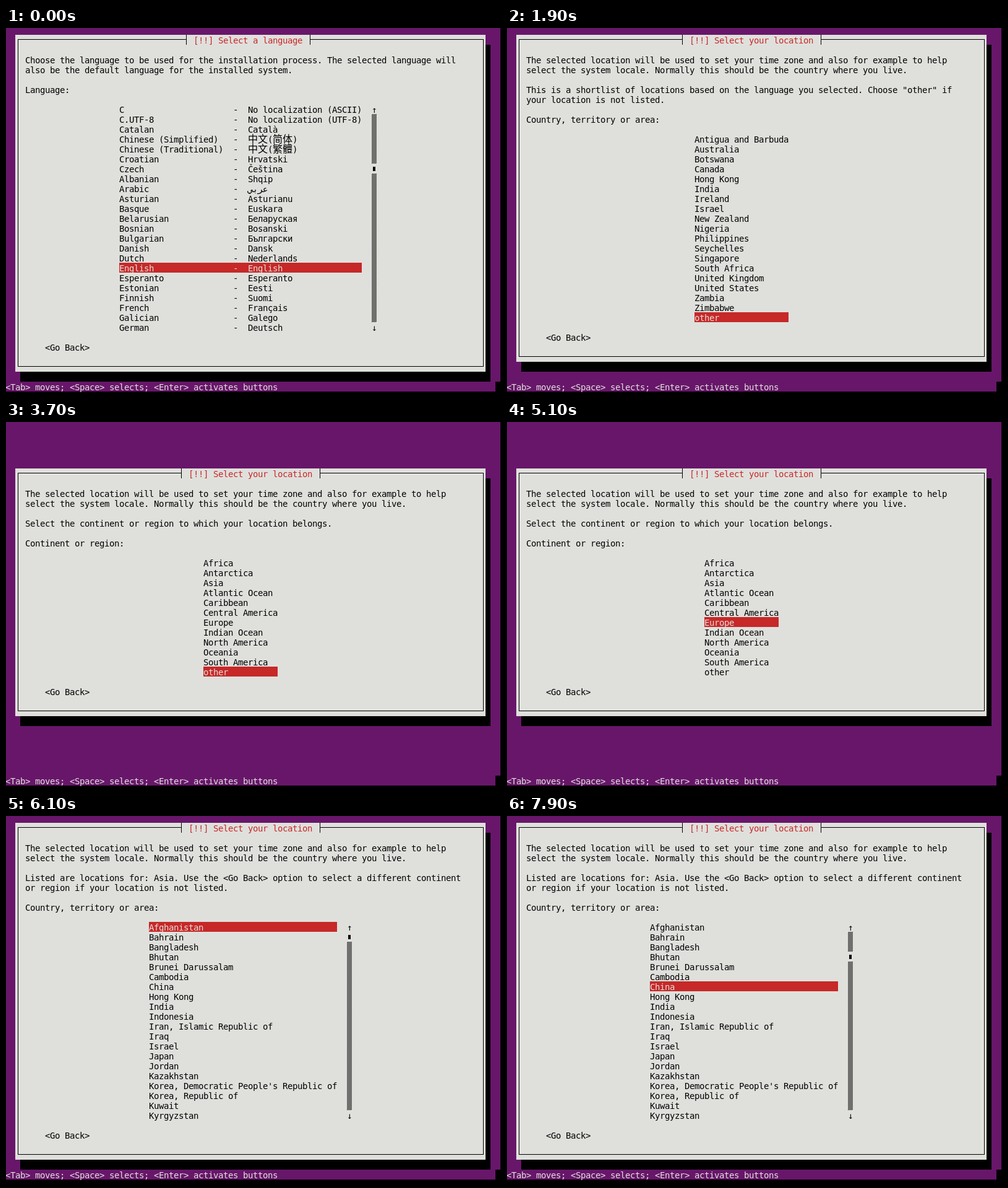
An HTML page that plays this animation: 800 px wide and 591 px high, repeating every 8 s.

```html
<!DOCTYPE html>
<html lang="en">
<head>
<meta charset="utf-8">
<title>Installer</title>
<style>
  :root { --purple: #68166a; --paper: #dfe0dc; --red: #c72828; }
  html, body { margin: 0; width: 100%; height: 100%; overflow: hidden; background: #000; }
  #stage {
    position: relative; width: 800px; height: 591px; overflow: hidden; background: #000;
    font: 14px/16px "DejaVu Sans Mono", "Noto Sans CJK SC", "Noto Sans CJK", monospace;
    letter-spacing: calc(8px - 1ch);
    font-variant-ligatures: none;
  }
  #stage div { position: absolute; white-space: pre; }
  #stage i { font: 16px/0 "Noto Sans CJK SC", "Noto Sans CJK", sans-serif; letter-spacing: 0; }
  .desk { background: var(--purple); }
  .paper { background: var(--paper); }
  .ink { background: #000; }
  .bar { background: var(--red); }
  .title { color: var(--red); }
  .light { color: var(--paper); }
  .track { background: repeating-conic-gradient(#000 0 25%, #0000 0 50%) 0 0 / 2px 2px; }
</style>
</head>
<body>
<div id="stage"></div>
<script>
const LOOP = 8000;
const stage = document.getElementById('stage');
const LOCATION = '[!!] Select your location';
const ABOUT = `The selected location will be used to set your time zone and also for example to help
select the system locale. Normally this should be the country where you live.

`;

const languages = `C|No localization (ASCII)
C.UTF-8|No localization (UTF-8)
Catalan|Català
Chinese (Simplified)|中文(简体)
Chinese (Traditional)|中文(繁體)
Croatian|Hrvatski
Czech|Čeština
Albanian|Shqip
Arabic|عربي
Asturian|Asturianu
Basque|Euskara
Belarusian|Беларуская
Bosnian|Bosanski
Bulgarian|Български
Danish|Dansk
Dutch|Nederlands
English|English
Esperanto|Esperanto
Estonian|Eesti
Finnish|Suomi
French|Français
Galician|Galego
German|Deutsch`.split('\n').map(line => {
  const [name, native] = line.split('|');
  return name.padEnd(23) + '-  ' + native;
});

const screens = {
  language: {
    top: 1, col: 23, title: '[!!] Select a language', items: languages, thumb: () => 5,
    intro: `Choose the language to be used for the installation process. The selected language will
also be the default language for the installed system.

Language:`
  },
  shortlist: {
    top: 1, col: 38, title: LOCATION,
    intro: ABOUT + `This is a shortlist of locations based on the language you selected. Choose "other" if
your location is not listed.

Country, territory or area:`,
    items: `Antigua and Barbuda
Australia
Botswana
Canada
Hong Kong
India
Ireland
Israel
New Zealand
Nigeria
Philippines
Seychelles
Singapore
South Africa
United Kingdom
United States
Zambia
Zimbabwe
other`.split('\n')
  },
  region: {
    top: 5, col: 40, title: LOCATION,
    intro: ABOUT + `Select the continent or region to which your location belongs.

Continent or region:`,
    items: `Africa
Antarctica
Asia
Atlantic Ocean
Caribbean
Central America
Europe
Indian Ocean
North America
Oceania
South America
other`.split('\n')
  },
  asia: {
    top: 1, col: 29, title: LOCATION, thumb: i => Math.round(i * 18 / 50),
    intro: ABOUT + `Listed are locations for: Asia. Use the <Go Back> option to select a different continent
or region if your location is not listed.

Country, territory or area:`,
    items: `Afghanistan
Bahrain
Bangladesh
Bhutan
Brunei Darussalam
Cambodia
China
Hong Kong
India
Indonesia
Iran, Islamic Republic of
Iraq
Israel
Japan
Jordan
Kazakhstan
Korea, Democratic People's Republic of
Korea, Republic of
Kuwait
Kyrgyzstan`.split('\n')
  }
};

// [start time, screen, selected item]
const steps = [
  [0, 'language', 16],
  [500, 'shortlist', 15], [1600, 'shortlist', 16], [1700, 'shortlist', 17], [1900, 'shortlist', 18],
  [2700, 'region', 8], [3400, 'region', 9], [3500, 'region', 10], [3700, 'region', 11],
  [4600, 'region', 10], [4700, 'region', 9], [4900, 'region', 8], [5000, 'region', 7],
  [5100, 'region', 6], [5300, 'region', 5], [5400, 'region', 4], [5500, 'region', 3],
  [5700, 'region', 2],
  [6000, 'blank', 0],
  [6100, 'asia', 0], [7100, 'asia', 1], [7300, 'asia', 2], [7500, 'asia', 3],
  [7600, 'asia', 4], [7800, 'asia', 5], [7900, 'asia', 6]
];

// The terminal grid has 8 x 16 cells and is cropped by 1 and 5 pixels.
const px = col => col * 8 - 1;
const py = row => row * 16 - 5;

const rect = (kind, x, y, w, h) =>
  `<div class="${kind}" style="left:${x}px;top:${y}px;width:${w}px;height:${h}px"></div>`;

const cells = (kind, col, row, w, h) => rect(kind, px(col), py(row), w * 8, h * 16);

function text(col, row, str, kind = '') {
  const html = str.replace(/</g, '&lt;').replace(/[\u4e00-\u9fff]+/g, '<i>$&</i>');
  return `<div class="${kind}" style="left:${px(col)}px;top:${py(row) + 1}px">${html}</div>`;
}

function frame(top, bottom, title) {
  const left = px(2) + 4, right = px(96) + 4, y = py(top) + 7, end = py(bottom - 1) + 7;
  const tab = 2 + Math.floor((95 - title.length - 4) / 2);
  const a = px(tab) + 4, b = px(tab + title.length + 3) + 4;
  return cells('ink', 3, top + 1, 95, bottom - top) +
    cells('paper', 2, top, 95, bottom - top) +
    rect('ink', left, y, a - left, 1) + rect('ink', b, y, right - b, 1) +
    rect('ink', a, py(top), 1, 16) + rect('ink', b, py(top), 1, 16) +
    rect('ink', left, end, right - left + 1, 1) +
    rect('ink', left, y, 1, end - y) + rect('ink', right, y, 1, end - y) +
    text(tab + 2, top, title, 'title');
}

function scrollbar(col, row, count, thumb) {
  const at = row + 1 + thumb;
  return text(col, row, '↑') + text(col, row + count - 1, '↓') +
    cells('track', col, row + 1, 1, count - 2) +
    cells('paper', col, at, 1, 1) +
    rect('ink', px(col) + 2, py(at) + 5, 4, 7);
}

function dialog({ top, col, title, intro, items, thumb }, selected) {
  const list = top + 3 + intro.split('\n').length;
  const back = list + items.length + 1;
  const width = Math.max(...items.map(item => item.length));
  return frame(top, back + 3, title) +
    text(4, top + 2, intro) +
    cells('bar', col, list + selected, width, 1) +
    items.map((item, i) => text(col, list + i, item, i === selected ? 'light' : '')).join('') +
    (thumb ? scrollbar(col + width + 2, list, items.length, thumb(selected)) : '') +
    text(8, back, '<Go Back>') +
    text(0, 36, '<Tab> moves; <Space> selects; <Enter> activates buttons', 'light');
}

function draw([, name, selected]) {
  stage.innerHTML = rect('desk', 0, 0, 799, 587) + cells('ink', 99, 36, 1, 1) +
    (screens[name] ? dialog(screens[name], selected) : '');
}

let shown;
function tick() {
  const t = performance.now() % LOOP;
  const step = steps.findLast(s => s[0] <= t);
  if (step !== shown) draw(shown = step);
  requestAnimationFrame(tick);
}
tick();
</script>
</body>
</html>
```
